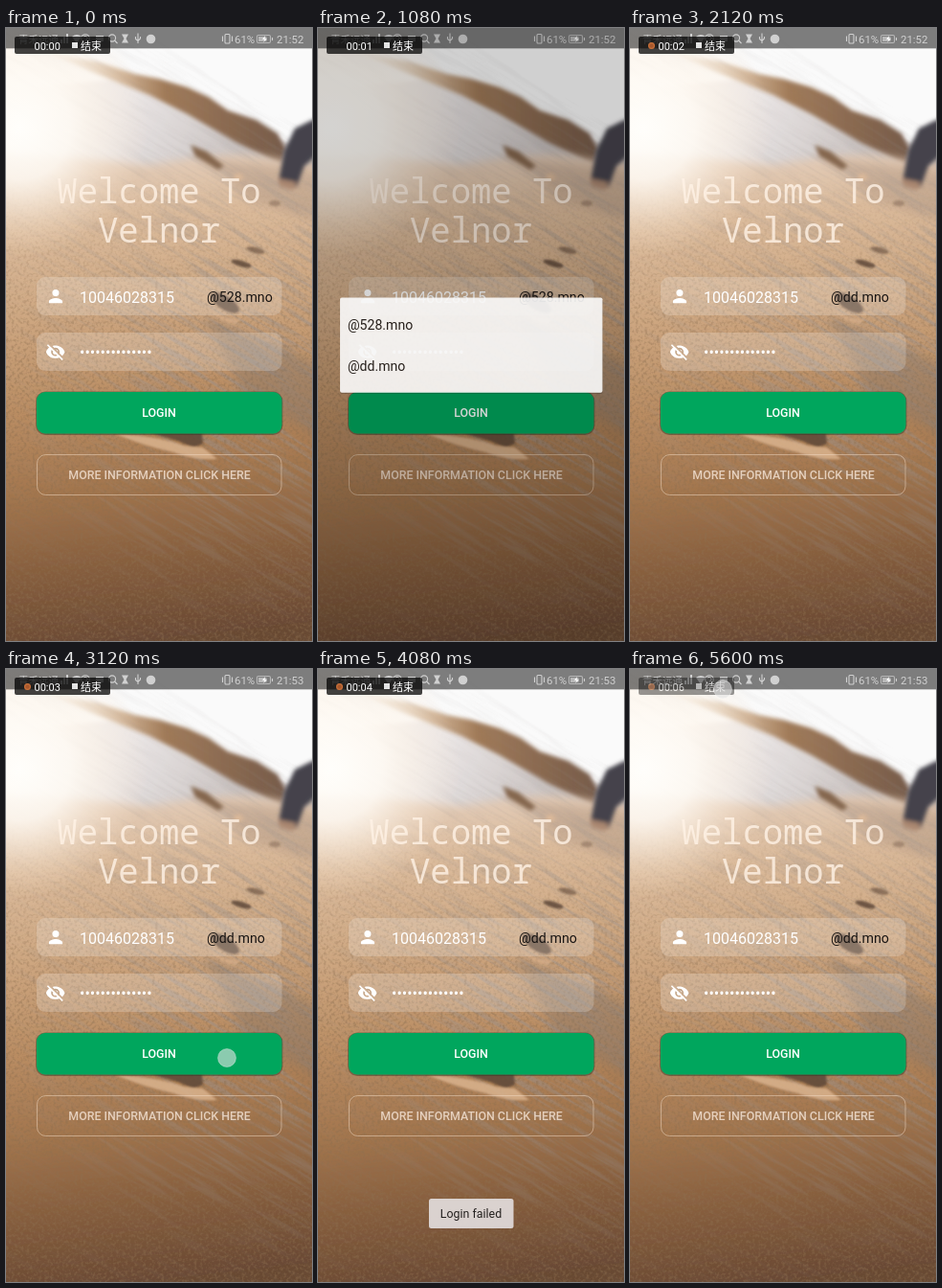
An HTML page for the animation above (5.64 s loop, 320x640 px).

```html
<!DOCTYPE html>
<html lang="en">
<head>
<meta charset="utf-8">
<title>Login</title>
<style>
  html, body { margin: 0; width: 100%; height: 100%; overflow: hidden; background: #fff; }
  svg { position: absolute; left: 0; top: 0; width: 320px; height: 640px; will-change: transform; }
  text { font-family: Roboto, sans-serif; white-space: pre; }
  .mono { font: 300 35.56px "Noto Sans Mono", monospace; fill: #fff2e6; fill-opacity: .8; text-anchor: middle; }
  .cap { font-size: 12.4px; font-weight: 500; text-anchor: middle; }
  .item { font-size: 14.2px; fill: #191513; }
  .big { font-size: 16px; fill: #fff; }
  .status { font-size: 11.4px; fill: #d0d0d0; }
  .cjk { font-family: "Noto Sans CJK SC", "Noto Sans CJK", sans-serif; }
  .rec { font-size: 11px; fill: #fff; }
</style>
</head>
<body>
<!-- beach -->
<svg viewBox="0 0 320 640">
  <defs>
    <linearGradient id="sand" gradientUnits="userSpaceOnUse" x1="110" y1="115" x2="170" y2="640">
      <stop offset="0" stop-color="#e6d3c4"/>
      <stop offset=".16" stop-color="#dbbb9c"/>
      <stop offset=".34" stop-color="#cda680"/>
      <stop offset=".52" stop-color="#b98c62"/>
      <stop offset=".68" stop-color="#a3764e"/>
      <stop offset=".85" stop-color="#845c3c"/>
      <stop offset="1" stop-color="#684833"/>
    </linearGradient>
    <linearGradient id="sea" x1="0" y1="0" x2="1" y2=".3">
      <stop offset="0" stop-color="#fffcf8"/>
      <stop offset=".4" stop-color="#eae6e6"/>
      <stop offset="1" stop-color="#b9b0ad"/>
    </linearGradient>
    <linearGradient id="hill" x1="0" y1="0" x2="1" y2="0">
      <stop offset="0" stop-color="#eadbc9" stop-opacity=".3"/>
      <stop offset=".3" stop-color="#c9a682" stop-opacity=".8"/>
      <stop offset=".5" stop-color="#a07a58"/>
      <stop offset="1" stop-color="#765b4a"/>
    </linearGradient>
    <radialGradient id="glow">
      <stop offset="0" stop-color="#fffefb"/>
      <stop offset=".4" stop-color="#fffaf3" stop-opacity=".85"/>
      <stop offset=".75" stop-color="#fff1e0" stop-opacity=".3"/>
      <stop offset="1" stop-color="#ffe8d0" stop-opacity="0"/>
    </radialGradient>
    <linearGradient id="fade" x1="0" y1="0" x2="0" y2="1">
      <stop offset=".05" stop-color="#000" stop-opacity="0"/>
      <stop offset=".45" stop-color="#000"/>
    </linearGradient>
    <radialGradient id="right" cx=".654" cy=".387" r=".42">
      <stop offset="0" stop-color="#000"/>
      <stop offset=".3" stop-color="#000" stop-opacity=".8"/>
      <stop offset="1" stop-color="#000" stop-opacity=".1"/>
    </radialGradient>
    <filter id="soft1" x="-30%" y="-30%" width="160%" height="160%"><feGaussianBlur stdDeviation="1.2"/></filter>
    <filter id="soft2" x="-30%" y="-30%" width="160%" height="160%"><feGaussianBlur stdDeviation="2"/></filter>
    <filter id="soft5" x="-30%" y="-30%" width="160%" height="160%"><feGaussianBlur stdDeviation="5"/></filter>
    <filter id="streaks" x="0" y="0" width="100%" height="100%">
      <feTurbulence type="fractalNoise" baseFrequency=".014 .2" numOctaves="3" seed="4"/>
      <feColorMatrix values="0 0 0 0 .31  0 0 0 0 .28  0 0 0 0 .27  3.6 0 0 0 -1.6"/>
      <feComposite operator="in" in2="SourceAlpha"/>
    </filter>
    <filter id="grain" x="0" y="0" width="100%" height="100%">
      <feTurbulence type="fractalNoise" baseFrequency=".32" numOctaves="2" seed="9"/>
      <feColorMatrix values="0 0 0 0 .27  0 0 0 0 .16  0 0 0 0 .08  3.5 0 0 0 -1.6"/>
      <feComposite operator="in" in2="SourceAlpha"/>
    </filter>
  </defs>
  <rect width="320" height="640" fill="#fafafa"/>
  <path d="M-10 66L110 54L190 80L330 134V260L-10 160Z" fill="url(#sea)" filter="url(#soft2)"/>
  <path d="M40 25L95 35L135 48L160 53L190 62L212 72L232 86L262 96L284 110L292 126L288 142L240 119L190 90L150 70L95 48Z" fill="url(#hill)" filter="url(#soft2)"/>
  <path d="M-20 130L80 136L150 143L205 134L250 132L340 146V660H-20Z" fill="url(#sand)" filter="url(#soft5)"/>
  <path d="M215 138L330 150V205L250 178Z" fill="#b39a86" opacity=".5" filter="url(#soft5)"/>
  <g transform="rotate(31 160 340)">
    <rect x="-180" y="60" width="680" height="620" fill="url(#right)" filter="url(#streaks)" opacity=".6"/>
  </g>
  <rect y="120" width="320" height="520" fill="url(#fade)" filter="url(#grain)" opacity=".42"/>
  <path d="M205 300L330 352V430L250 380Z" fill="#7d726b" opacity=".35" filter="url(#soft5)"/>
  <circle cx="14" cy="104" r="135" fill="url(#glow)"/>
  <g filter="url(#soft2)">
    <path d="M193 122L210 129L228 144L222 148L198 134Z" fill="#84664d"/>
    <ellipse cx="243" cy="156" rx="5" ry="4" fill="#dcb999"/>
    <path d="M330 92V128L312 144L304 166L285 161L291 128L302 105L316 98Z" fill="#45434b"/>
    <path d="M285 157L304 161L300 169L286 165Z" fill="#a9866f"/>
  </g>
  <g fill="#5d4737" filter="url(#soft1)" opacity=".85">
    <ellipse cx="281" cy="183" rx="6" ry="3" opacity=".4"/>
    <ellipse cx="261" cy="232" rx="10" ry="3" transform="rotate(14 261 232)" opacity=".7"/>
    <ellipse cx="246" cy="246" rx="11" ry="3" transform="rotate(16 246 246)"/>
    <ellipse cx="229" cy="287" rx="17" ry="7" transform="rotate(32 229 287)"/>
    <path d="M152 423H205L206 434L196 438L180 431Z"/>
  </g>
  <g fill="#dab38e" filter="url(#soft1)">
    <path d="M115 424Q160 426 186 436L206 438L221 450Q200 452 175 443Q140 435 115 424Z" opacity=".85"/>
    <path d="M214 294Q228 306 246 303L240 309Q224 308 214 294Z" opacity=".6"/>
  </g>
</svg>

<!-- interface -->
<svg viewBox="0 0 320 640">
  <defs>
    <clipPath id="btn"><rect x="32" y="380" width="256.500" height="43.500" rx="9"/></clipPath>
    <mask id="cut"><rect width="24" height="24" fill="#fff"/><path d="M3.500 1.700L22.300 20.500" stroke="#000" stroke-width="2.200"/></mask>
  </defs>
  <rect width="320" height="21.330" fill="#000" opacity=".5"/>
  <g fill="#d0d0d0">
    <text class="status cjk" x="13" y="15.500" style="font-size:10.500px">青禾远通</text>
    <path d="M57 16V12h2v4zM60 16V9h2v7zM63 16V6h2v10z"/>
    <path d="M69 9q5-4 10 0l-5 7z"/>
    <rect x="94" y="8" width="8" height="6"/>
    <path d="M121 6.500h7l-2.500 4.500 2.500 4.500h-7l2.500-4.500z"/>
    <circle cx="151.500" cy="11.500" r="4.800"/>
  </g>
  <g fill="none" stroke="#d0d0d0" stroke-width="1.100">
    <circle cx="83" cy="11" r="4.300"/><path d="M81 9.500q2-2 3.500 0t-1.500 3.500"/>
    <circle cx="111" cy="10.500" r="3.600"/><path d="M113.500 13l3 3"/>
    <path d="M138 5.500V16M135.500 9v2.500l2.500 2 2.500-2.500V9"/>
    <rect x="229" y="6.500" width="5" height="9.500" rx="1"/><path d="M226.500 8.500v5.500M236.500 8.500v5.500"/>
    <rect x="262.500" y="7.500" width="14" height="8" rx="1.500" stroke-opacity=".7"/><path d="M278.500 10v3"/>
  </g>
  <rect x="264" y="9" width="8.500" height="5" fill="#d0d0d0" opacity=".7"/>
  <path d="M271 8l-3 4h2.500l-1.500 3 4-4h-2.500z" fill="#fff"/>
  <text class="status" x="239" y="15.500">61%</text>
  <text class="status" id="clock" x="283" y="15.500"></text>

  <text class="mono" x="160" y="183">Welcome To</text>
  <text class="mono" x="160" y="224">Velnor</text>

  <g fill="#fff" fill-opacity=".2">
    <rect x="32" y="260" width="256.500" height="40" rx="9"/>
    <rect x="32" y="318" width="256.500" height="40" rx="9"/>
  </g>
  <g fill="#fff">
    <path transform="translate(41.300 269.500) scale(.889)" d="M12 12a4 4 0 1 0 0-8a4 4 0 0 0 0 8zm0 2c-2.700 0-8 1.300-8 4v2h16v-2c0-2.700-5.300-4-8-4z"/>
    <g transform="translate(41 327.500) scale(.889)">
      <path mask="url(#cut)" fill-rule="evenodd" d="M1 12C4.600 2 19.400 2 23 12C19.400 22 4.600 22 1 12zM7 12a5 5 0 1 0 10 0a5 5 0 0 0-10 0zM9 12a3 3 0 1 0 6 0a3 3 0 0 0-6 0z"/>
      <path d="M2.700 3.600L20.400 21.300" stroke="#fff" stroke-width="1.800"/>
    </g>
  </g>
  <text class="big" x="77" y="287">10046028315</text>
  <text class="item" id="host" x="210" y="286"></text>
  <text class="big" x="77" y="343.500">••••••••••••••</text>

  <rect x="32" y="380.500" width="256.500" height="43.500" rx="9" fill="none" stroke="#2a2a1c" stroke-opacity=".4" stroke-width="1.800"/>
  <rect x="32" y="380" width="256.500" height="43.500" rx="9" fill="#00a65d"/>
  <g clip-path="url(#btn)"><circle id="ripple" cx="231" cy="406" fill="#fff"/></g>
  <text class="cap" x="160" y="406" fill="#fff">LOGIN</text>
  <rect x="32.500" y="445.500" width="255.500" height="42" rx="9" fill="none" stroke="#f3dcc6" stroke-opacity=".5"/>
  <text class="cap" x="160.500" y="471" fill="#f6e6d8" fill-opacity=".8">MORE INFORMATION CLICK HERE</text>

  <g id="toast">
    <rect x="116" y="553" width="88.500" height="31" rx="2.500" fill="#dfd9d7" fill-opacity=".95"/>
    <text x="160" y="573" text-anchor="middle" font-size="12.400" fill="#24211f">Login failed</text>
  </g>

  <rect id="dim" width="320" height="640"/>
  <g id="popup">
    <rect x="22" y="282.500" width="276.500" height="100" rx="2" fill="#000" opacity=".2"/>
    <rect x="22" y="281" width="276.500" height="100" rx="2" fill="#fafafa"/>
    <rect id="press" x="22" y="331" width="276.500" height="43" fill="#000"/>
    <text class="item" x="30" y="315">@528.mno</text>
    <text class="item" x="30" y="358">@dd.mno</text>
  </g>

  <g id="bar">
    <rect x="9" y="9" width="100" height="18" rx="2" fill="#000" fill-opacity=".74"/>
    <circle id="dot" cx="22.500" cy="18.500" r="2.900" fill="#a8582c" stroke="#c8703a" stroke-width="1.200"/>
    <text class="rec" id="timer" x="29.500" y="22.500"></text>
    <rect x="69" y="15" width="6" height="6" fill="#e4e4e4"/>
    <text class="rec cjk" x="78" y="22.500">结束</text>
  </g>
  <circle id="touch" r="9.500" fill="#e2e2e2" fill-opacity=".6" stroke="#f2f2f2" stroke-opacity=".35"/>
</svg>

<script>
const LOOP = 5640;
const el = Object.fromEntries([...document.querySelectorAll('[id]')].map(n => [n.id, n]));

const ticks = [520, 1560, 2680, 3520, 4600, 5520];
const blinks = [240, 720, 1120, 1560, 2000, 2400, 2880, 3440, 3920, 4400, 4800, 5200, 5560];
// start, end, x, y
const touches = [
  [760, 880, 244, 282],
  [1560, 1680, 104, 354],
  [3080, 3200, 231, 406],
  [5560, LOOP, 97, 21]
];

const ramp = (t, a, b) => Math.min(1, Math.max(0, (t - a) / (b - a)));
const easeOut = (p, n) => 1 - (1 - p) ** n;
const passed = (list, t) => list.filter(x => t >= x).length;
const fade = (node, v) => node.setAttribute('opacity', v.toFixed(3));
const write = (node, s) => { if (node.textContent !== s) node.textContent = s; };

function draw(t) {
  write(el.timer, '00:0' + passed(ticks, t));
  write(el.clock, t < 2960 ? '21:52' : '21:53');
  write(el.host, t < 1720 ? '@528.mno' : '@dd.mno');
  fade(el.dot, passed(blinks, t) % 2);
  fade(el.bar, t < 5560 ? 1 : .55);

  // dialog
  const close = ramp(t, 1720, 1960);
  fade(el.dim, .5 * ramp(t, 1000, 1240) * (1 - close));
  fade(el.popup, easeOut(ramp(t, 1000, 1150), 3) * (1 - ramp(t, 1720, 1870)));
  const s = .9 + .1 * easeOut(ramp(t, 1000, 1200), 5);
  el.popup.setAttribute('transform', `translate(160 331) scale(${s.toFixed(4)}) translate(-160 -331)`);
  fade(el.press, .1 * ramp(t, 1560, 1680));

  // button ripple
  el.ripple.setAttribute('r', 8 + 200 * easeOut(ramp(t, 3120, 3400), 2));
  fade(el.ripple, .14 * ramp(t, 3100, 3180) * (1 - ramp(t, 3240, 3440)));

  fade(el.toast, ramp(t, 3540, 3760) * (1 - ramp(t, 5280, 5520)));

  const hit = touches.find(([a, b]) => t >= a && t < b);
  fade(el.touch, hit ? 1 : 0);
  if (hit) el.touch.setAttribute('transform', `translate(${hit[2]} ${hit[3]})`);
}

const start = performance.now();
function tick() {
  draw((performance.now() - start) % LOOP);
  requestAnimationFrame(tick);
}
draw(0);
requestAnimationFrame(tick);
</script>
</body>
</html>
```
